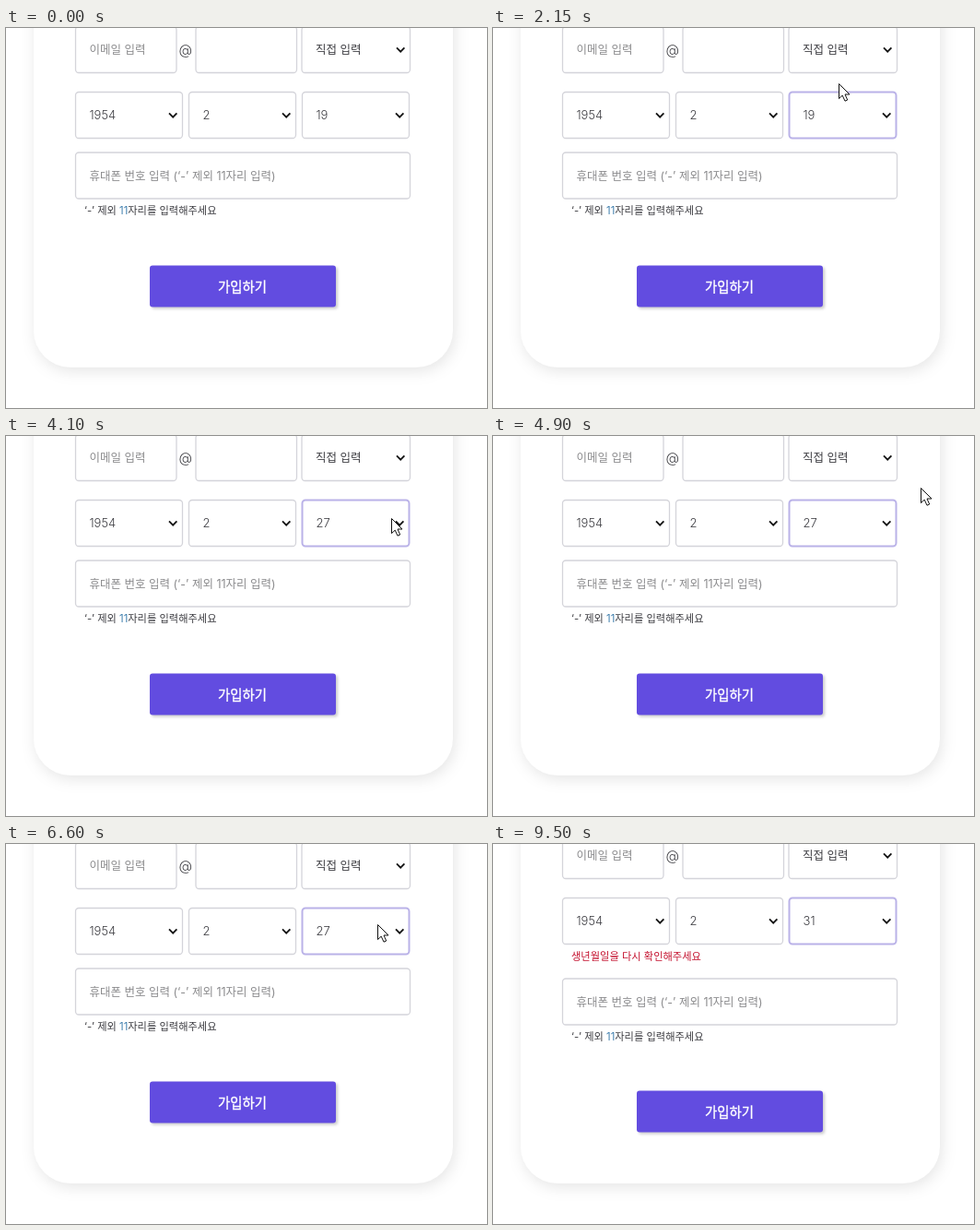
An HTML page for the animation above (10000 ms loop, 522 px wide and 412 px high).

```html
<!DOCTYPE html>
<html lang="ko">
<head>
<meta charset="utf-8">
<style>
  html, body { margin: 0; width: 100%; height: 100%; overflow: hidden; background: #fff; }
  svg { display: block; }
  text { font: 12.5px Inter, "Noto Sans CJK KR", "Noto Sans CJK JP", "Noto Sans CJK", sans-serif; fill: #3d3d42; white-space: pre; }
  .hold { fill: #8b8b8d; }
  .num { font-size: 13px; font-weight: 300; }
  .at { font-size: 15px; font-weight: 300; }
  .note { font-size: 11.25px; }
  .bad { fill: #c4122f; }
  .box { fill: #fff; stroke: #d4d4da; stroke-width: 1.3; }
  .focus { stroke: #bab2e8; stroke-width: 2; }
  .arrow { fill: none; stroke: #161616; stroke-width: 1.9; }
  .card { fill: #fff; filter: drop-shadow(2px 4px 8px rgba(0, 0, 0, .1)); }
  .btn { fill: #624ce0; filter: drop-shadow(2px 2px 1.5px rgba(0, 0, 0, .2)); }
  .label { font-size: 14.4px; fill: #fff; stroke: #fff; stroke-width: .35; }
</style>
</head>
<body>
<svg width="522" height="412" viewBox="0 0 522 412">
  <path class="card" d="M30-60H485V328a40 40 0 0 1-40 40H70a40 40 0 0 1-40-40Z"/>
  <g id="upper"></g>
  <text id="error" class="note bad" x="85" y="125.5">생년월일을 다시 확인해주세요</text>
  <g id="lower"></g>
  <g id="submit">
    <rect class="btn" x="156" y="257.5" width="202" height="45" rx="3"/>
    <text class="label" x="256.5" y="285.5" text-anchor="middle">가입하기</text>
  </g>
  <path id="cursor" d="M.5.5V16.6L4.2 13.1 7 19.2 9.7 18 7 12H12Z" fill="#fff" stroke="#111" stroke-linejoin="round"/>
</svg>
<script>
const $ = id => document.getElementById(id);

const text = (x, y, s, cls = '') => `<text class="${cls}" x="${x}" y="${y}">${s}</text>`;
const field = (x, y, w, s = '', cls = '') =>
  `<rect class="box" x="${x}" y="${y}" width="${w}" height="50" rx="3.5"/>` + text(x + 15, y + 29.9, s, cls);
const select = (x, y, w, s, cls) =>
  field(x, y, w, s, cls) + `<path class="arrow" d="M${x + w - 14.5} ${y + 22.9}l4.2 4.2 4.2-4.2"/>`;

$('upper').innerHTML =
  field(75.5, -1.5, 109.5, '이메일 입력', 'hold') + text(187.5, 28.5, '@', 'at') +
  field(206, -1.5, 109.5) + select(321, -1.5, 117.5, '직접 입력') +
  [1954, 2, 19].map((s, i) => `<g>${select(75.5 + 123 * i, 69.5, 116, s, 'num')}</g>`).join('');
$('lower').innerHTML =
  field(75.5, 135, 363, '휴대폰 번호 입력 (‘-’ 제외 11자리 입력)', 'hold') +
  text(85, 202, '‘-’ 제외 <tspan fill="#3f7fae">11</tspan>자리를 입력해주세요', 'note');

const dayGroup = $('upper').lastElementChild;
const dayBox = dayGroup.querySelector('rect');
const dayText = dayGroup.querySelector('text');

const LOOP = 10000, STEP = 50, ENTER = 150, FOCUS = 850, LEAVE = 9500;
const entry = [-14, 145];
// where the pointer stops: departure, arrival, x, y
const stops = [
  [ENTER, FOCUS, 352, 101], [1050, 1150, 354, 48], [1400, 1700, 279, 259],
  [1900, 2150, 375, 60], [2500, 2950, 388, 78], [3100, 3450, 418, 89],
  [4100, 4900, 464, 56], [5150, 6100, 293, 245], [6200, 6600, 403, 87],
  [7200, 7350, 383, 30], [8450, 9300, 396, 47]
];

const ease = k => k * k * (3 - 2 * k);
const clamp = k => Math.min(1, Math.max(0, k));

function pointer(t) {
  let [x, y] = entry;
  for (const [from, to, nx, ny] of stops) {
    const k = ease(clamp((t - from) / (to - from)));
    x += (nx - x) * k;
    y += (ny - y) * k;
  }
  return [x, y];
}

const dayAt = t => t < 2350 ? 19 : t < 4100 ? 31 : t < 8900 ? 27 : 31;
const move = (id, x, y) => $(id).setAttribute('transform', `translate(${Math.round(x)} ${Math.round(y)})`);
const show = (id, on) => $(id).style.display = on ? '' : 'none';

function draw(now) {
  const t = Math.floor(now % LOOP / STEP) * STEP;
  const day = dayAt(t);
  const bad = day === 31;
  dayText.textContent = day;
  dayBox.classList.toggle('focus', t >= FOCUS);
  show('error', bad);
  move('upper', 0, bad ? -11 : 0);
  move('lower', 0, bad ? 11 : 0);
  move('submit', 0, bad ? 10 : 0);
  show('cursor', t >= ENTER && t < LEAVE);
  move('cursor', ...pointer(t));
}

const start = performance.now();
function tick() {
  draw(performance.now() - start);
  requestAnimationFrame(tick);
}
tick();
</script>
</body>
</html>
```
